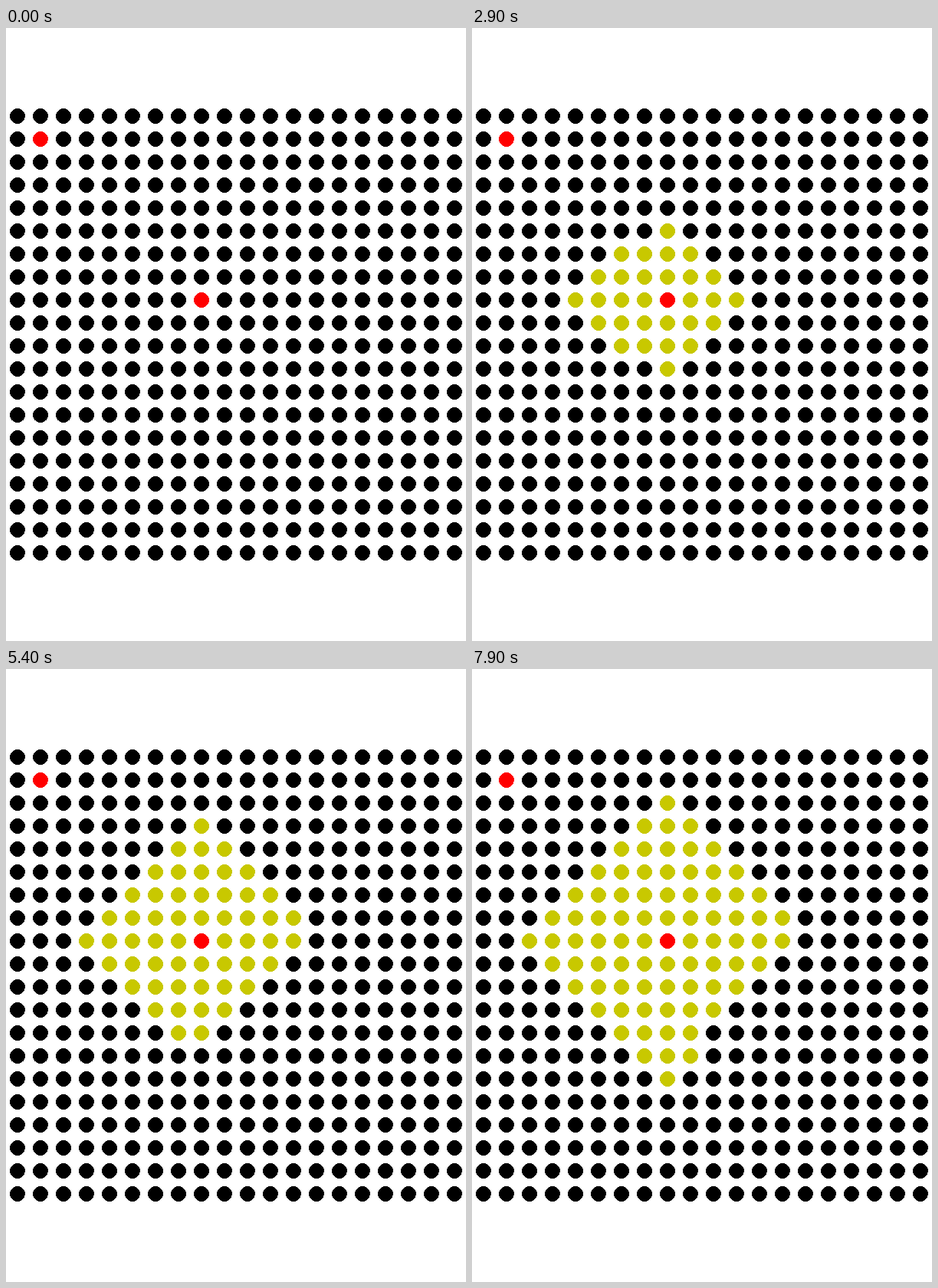
An HTML page that plays this animation: 600 px wide and 800 px high, repeating every 8 s.

```html
<!DOCTYPE html>
<html lang="en">
<head>
<meta charset="utf-8">
<title>Breadth-first search</title>
<style>
  html, body { margin: 0; width: 100%; height: 100%; overflow: hidden; background: #fff; }
  svg { display: block; width: 600px; height: 800px; }
</style>
</head>
<body>
<svg id="stage" viewBox="0 0 600 800" shape-rendering="crispEdges"></svg>
<script>
const SIZE = 20, CELL = 30, TOP = 100, RADIUS = 10;
const STEP = 100, LOOP = 8000, STEPS = LOOP / STEP;
const IDLE = '#000', VISITED = '#c8c800', END = '#f00';
const start = { col: 8, row: 8 }, goal = { col: 1, row: 1 };
const directions = [[-1, 0], [0, -1], [0, 1], [1, 0]]; // left, up, down, right

const stage = document.getElementById('stage');
const indexOf = ({ col, row }) => row * SIZE + col;
const inside = ({ col, row }) => col >= 0 && row >= 0 && col < SIZE && row < SIZE;

// Cells in the order the search discovers them, without the start.
function searchOrder(limit) {
  const queue = [start], seen = new Set([indexOf(start)]);
  for (let head = 0; queue.length <= limit; head++) {
    for (const [dx, dy] of directions) {
      const next = { col: queue[head].col + dx, row: queue[head].row + dy };
      if (!inside(next) || seen.has(indexOf(next))) continue;
      seen.add(indexOf(next));
      queue.push(next);
    }
  }
  return queue.slice(1).map(indexOf);
}

const dots = Array.from({ length: SIZE * SIZE }, (_, i) => {
  const dot = document.createElementNS('http://www.w3.org/2000/svg', 'circle');
  dot.setAttribute('cx', (i % SIZE + 0.5) * CELL);
  dot.setAttribute('cy', TOP + (Math.floor(i / SIZE) + 0.5) * CELL);
  dot.setAttribute('r', RADIUS);
  dot.setAttribute('fill', IDLE);
  return stage.appendChild(dot);
});
for (const end of [start, goal]) dots[indexOf(end)].setAttribute('fill', END);

const order = searchOrder(STEPS).slice(0, STEPS - 1);

function render(time) {
  const count = Math.floor(time % LOOP / STEP);
  order.forEach((cell, i) => dots[cell].setAttribute('fill', i < count ? VISITED : IDLE));
}

let origin;
function tick(now) {
  origin ??= now;
  render(now - origin);
  requestAnimationFrame(tick);
}
render(0);
requestAnimationFrame(tick);
</script>
</body>
</html>
```
